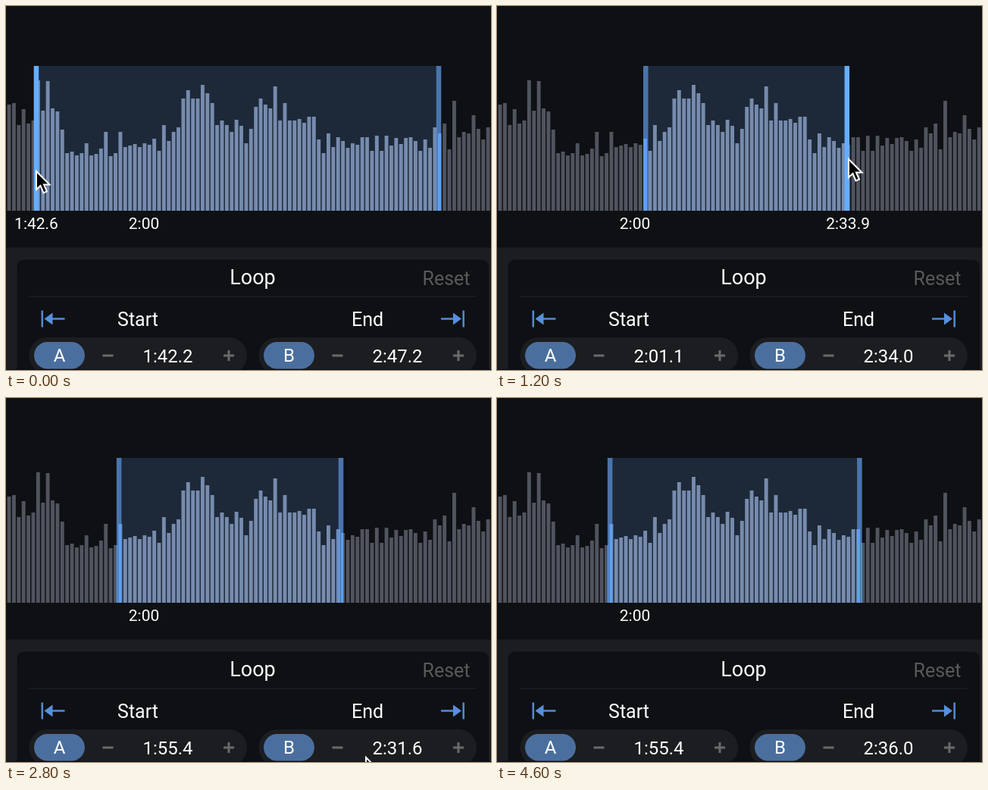
Recreate the animation shown at these times as an HTML page with a canvas. Size 640x480 px, loop 4.8 s.

```html
<!DOCTYPE html>
<html lang="en">
<head>
<meta charset="utf-8">
<title>Loop editor</title>
<style>
  html, body { margin: 0; width: 100%; height: 100%; overflow: hidden; background: #0e1013; }
  canvas { display: block; }
</style>
</head>
<body>
<canvas id="stage" width="640" height="480"></canvas>
<script>
const ctx = document.getElementById('stage').getContext('2d');
const STEP = 200, STEPS = 24;
const TOP = 79, BASE = 270, GRIP = 6.5;
const PANEL = '#1c1d20', DARK = '#0e1013', GREY = '#696a6d', WHITE = '#fff';

// Top edge of each waveform bar
const peaks = [
  130, 128, 157, 136, 155, 151, 98, 138, 99, 135, 139, 163, 194, 192, 197, 194, 181, 197, 195, 188,
  166, 198, 194, 166, 186, 184, 182, 186, 181, 183, 175, 191, 157, 178, 166, 160, 122, 111, 122, 122,
  104, 115, 128, 157, 151, 157, 166, 150, 158, 181, 162, 133, 122, 130, 135, 106, 151, 128, 151, 151,
  149, 154, 146, 146, 176, 194, 168, 186, 173, 178, 187, 181, 183, 173, 173, 191, 171, 191, 171, 184,
  174, 182, 174, 173, 178, 191, 176, 187, 160, 168, 155, 189, 125, 173, 166, 168, 144, 162, 176, 160
];

// Keys: [step, value, ...]
const startKeys = [[0, 102.2], [1, 118], [2, 121.1], [8, 121.1], [9, 117], [10, 111.1], [12, 109], [14, 115.4]];
const endKeys = [[4, 167.2], [5, 160], [6, 154], [7, 151.6], [17, 151.6], [19, 152.6], [21, 155.4], [22, 156]];
const pointerKeys = [
  [0, 40, 218], [1, 171, 215], [2, 197, 210], [4, 575, 197], [5, 513, 199], [6, 464, 202], [7, 443, 205],
  [8, 217, 447], [9, 217, 462], [10, 217, 500], [13, 300, 520], [14, 475, 474], [15, 515, 448],
  [17, 500, 380], [19, 438, 222], [21, 445, 66], [22, 445, 66], [23, 445, -60]
];

function at(keys, step) {
  const i = keys.findIndex(k => k[0] >= step);
  if (i < 0) return keys[keys.length - 1].slice(1);
  if (i === 0) return keys[0].slice(1);
  const a = keys[i - 1], b = keys[i], p = (step - a[0]) / (b[0] - a[0]);
  return a.slice(1).map((v, n) => v + (b[n + 1] - v) * p);
}

const timeToX = s => 193 + 8.27 * (s - 121.1);

function clock(s) {
  const tenths = Math.round(s * 10);
  const rest = (tenths % 600 / 10).toFixed(1).padStart(4, '0');
  return Math.floor(tenths / 600) + ':' + rest;
}

function box(x, y, w, h, color, radius = 0) {
  ctx.fillStyle = color;
  ctx.beginPath();
  ctx.roundRect(x, y, w, h, radius);
  ctx.fill();
}

function text(str, x, y, size, color = WHITE) {
  ctx.font = size + 'px Roboto, sans-serif';
  ctx.textAlign = 'center';
  ctx.fillStyle = color;
  ctx.fillText(str, x, y);
}

function bars(color, left, right) {
  ctx.save();
  ctx.beginPath();
  ctx.rect(left, 0, right - left, BASE);
  ctx.clip();
  peaks.forEach((y, i) => box(1.6 + i * 6.385, y, 4.9, BASE - y, color));
  ctx.restore();
}

function handle(x, active) {
  box(x, TOP, GRIP, BASE - TOP, active ? '#66adff' : '#4a74ac');
  if (!active) bars('#609fee', x, x + GRIP);
}

function jumpIcon(x, dir) {
  ctx.save();
  ctx.translate(x, 412.5);
  ctx.scale(dir, 1);
  box(0, -11, 2.6, 22, '#5187d3');
  box(8, -1.3, 23, 2.6, '#5187d3');
  ctx.fillStyle = '#568fdf';
  ctx.beginPath();
  ctx.moveTo(4, 0);
  ctx.lineTo(15, -8);
  ctx.lineTo(15, 8);
  ctx.fill();
  ctx.restore();
}

function stepper(x, letter, value) {
  box(x, 437, 287.5, 48, PANEL, 24);
  box(x + 6.5, 443, 67, 35.5, '#4a6f9f', 17.75);
  text(letter, x + 40, 469, 24);
  box(x + 97, 459.5, 14, 3, GREY);
  box(x + 256.5, 459.5, 14, 3, GREY);
  box(x + 262, 454, 3, 14, GREY);
  text(clock(value), x + 183, 469.5, 24);
}

function pointer(x, y) {
  ctx.save();
  ctx.translate(x, y);
  ctx.beginPath();
  [[0, 0], [0, 24], [5.5, 19], [9.5, 28.5], [14, 26.5], [10, 17.5], [17.5, 17.5]]
    .forEach(p => ctx.lineTo(...p));
  ctx.closePath();
  ctx.fillStyle = '#000';
  ctx.strokeStyle = WHITE;
  ctx.lineWidth = 2;
  ctx.fill();
  ctx.stroke();
  ctx.restore();
}

function draw(step) {
  const [start] = at(startKeys, step), [end] = at(endKeys, step);
  const left = timeToX(start), right = timeToX(end);
  const holdStart = step <= 2, holdEnd = step >= 4 && step <= 7;

  box(0, 0, 640, 480, DARK);
  box(left, TOP, right - left, BASE - TOP, '#1d2938');
  bars('#50545f', 0, left);
  bars('#768bad', left, right);
  bars('#50545f', right, 640);
  handle(left, holdStart);
  handle(right - GRIP, holdEnd);

  const labelX = holdStart ? left + 3.3 : holdEnd ? right - 2 : -100;
  if (Math.abs(labelX - 182) > 52) text('2:00', 182, 294, 21);
  text(clock(holdStart ? start + 0.4 : end - 0.1), labelX, 294, 21);

  box(0, 318.5, 640, 162, PANEL);
  box(14.5, 334.5, 622.5, 160, DARK, 9);
  text('Loop', 325.5, 367, 27);
  text('Reset', 581, 367.5, 25, '#59595c');
  box(30, 382.5, 591, 1.5, PANEL);
  jumpIcon(46.5, 1);
  jumpIcon(605, -1);
  text('Start', 174, 421.5, 25);
  text('End', 477, 421.5, 25);
  stepper(30.5, 'A', start);
  stepper(333.5, 'B', end);
  box(0, 479, 640, 1, '#0c0a0f');

  pointer(...at(pointerKeys, step));
}

function tick() {
  draw(Math.floor(performance.now() / STEP) % STEPS);
  requestAnimationFrame(tick);
}
tick();
</script>
</body>
</html>
```
